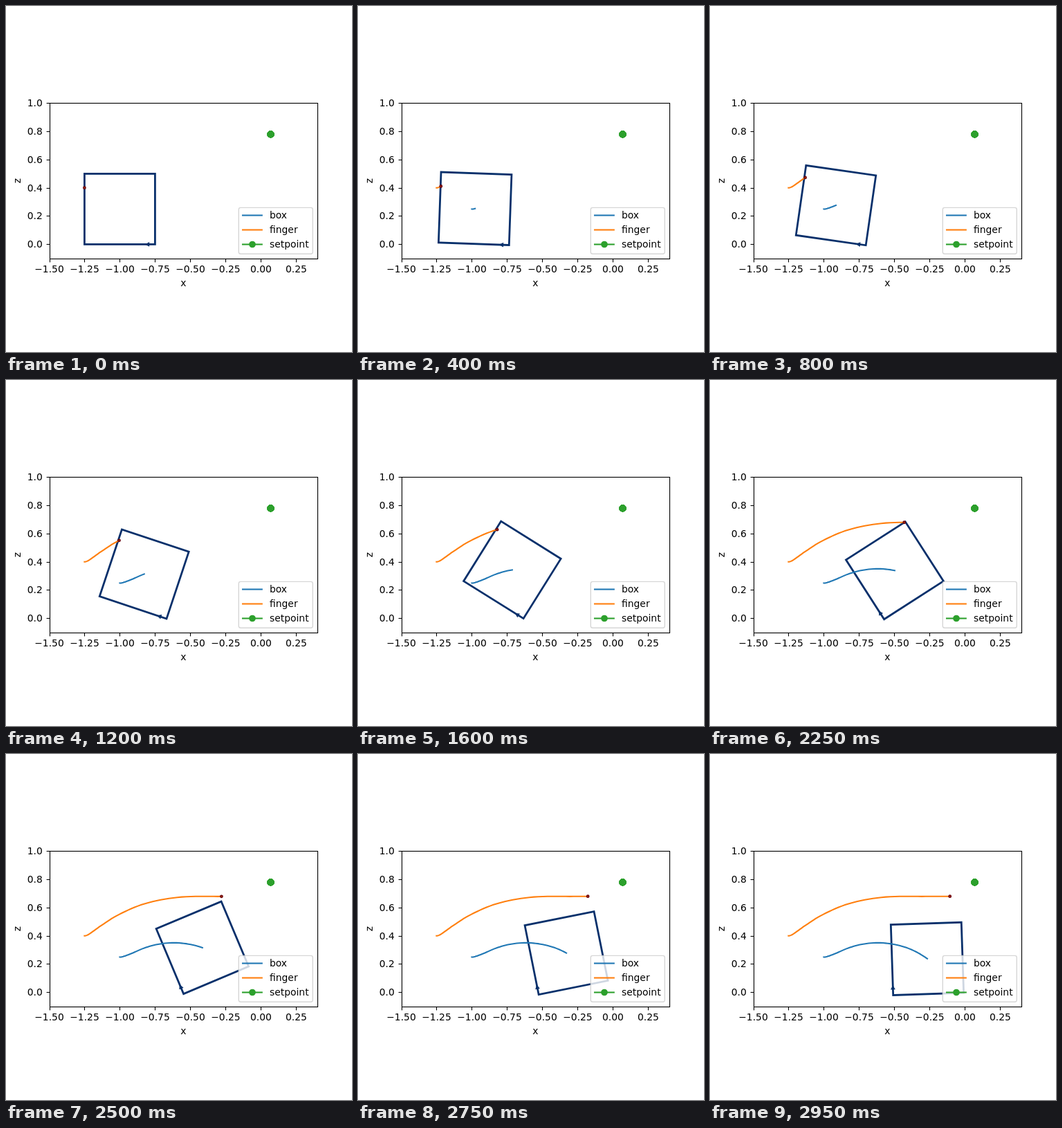
Recreate the animation shown at these times as an HTML page with a canvas. Size 500 by 500 pixels, loop 3 s.

```html
<!DOCTYPE html>
<html lang="en">
<head>
<meta charset="utf-8">
<title>Box and finger</title>
<style>
  html, body { margin: 0; width: 100%; height: 100%; overflow: hidden; background: #fff; }
  canvas { display: block; width: 500px; height: 500px; }
</style>
</head>
<body>
<canvas id="stage" width="500" height="500"></canvas>
<script>
const ctx = document.getElementById('stage').getContext('2d');
const LOOP = 3000, STEP = 50;
const PT = 100 / 72;
const SCALE = 387.5 / 1.9;
const SIDE = 0.5 * SCALE;
const BLUE = '#1f77b4', ORANGE = '#ff7f0e', GREEN = '#2ca02c', NAVY = '#08306b';

const px = x => 62.5 + (x + 1.5) * SCALE;
const pz = z => 140.33 + (1 - z) * SCALE;
const snap = v => Math.floor(v + 0.5) + 0.5;

// Key times and poses: box angle (degrees), pivot corner, finger
const times = [0, 400, 800, 1200, 1600, 2000, 2500, 2950];
const angle = [0, 2.05, 8.2, 18.4, 32, 47.8, 67.2, 88.1];
const pivotX = [215.4, 218.3, 225.2, 232, 239.1, 246.6, 256.6, 264.7];
const pivotY = [344.4, 345.5, 345.8, 344.9, 344.7, 345.1, 346.6, 348.5];
const fingerX = [113.4, 119.8, 137.6, 163.5, 201, 247.6, 311.4, 346.7];
const fingerY = [262.7, 260.5, 247.9, 231.8, 216.2, 207.2, 205.8, 205.7];

function slope(v, i) {
  if (i === 0) return 0;
  const d = j => (v[j + 1] - v[j]) / (times[j + 1] - times[j]);
  const last = times.length - 1;
  if (i === last) return d(i - 1);
  const a = times[i] - times[i - 1], b = times[i + 1] - times[i];
  return (d(i - 1) * b + d(i) * a) / (a + b);
}

// Cubic Hermite interpolation over the key times
function at(v, t) {
  let i = 0;
  while (i < times.length - 2 && t > times[i + 1]) i++;
  const h = times[i + 1] - times[i], u = (t - times[i]) / h;
  const u2 = u * u, u3 = u2 * u;
  return v[i] * (2 * u3 - 3 * u2 + 1) + v[i + 1] * (3 * u2 - 2 * u3)
    + h * (slope(v, i) * (u3 - 2 * u2 + u) + slope(v, i + 1) * (u3 - u2));
}

const finger = t => [at(fingerX, t), at(fingerY, t)];

function center(t) {
  const a = at(angle, t) * Math.PI / 180, c = Math.cos(a), s = Math.sin(a);
  return [at(pivotX, t) + SIDE / 2 * (s - c), at(pivotY, t) - SIDE / 2 * (s + c)];
}

function line(points, color, width, cap = 'butt') {
  ctx.beginPath();
  points.forEach(p => ctx.lineTo(p[0], p[1]));
  ctx.strokeStyle = color;
  ctx.lineWidth = width;
  ctx.lineCap = cap;
  ctx.stroke();
}

function disc(x, y, r, color) {
  ctx.beginPath();
  ctx.arc(x, y, r, 0, 2 * Math.PI);
  ctx.fillStyle = color;
  ctx.fill();
}

function label(s, x, y, align) {
  ctx.font = '13.89px "DejaVu Sans", sans-serif';
  ctx.textAlign = align;
  ctx.textBaseline = 'alphabetic';
  ctx.fillStyle = '#000';
  ctx.fillText(s, x, y);
}

function drawBox(t) {
  ctx.save();
  ctx.translate(at(pivotX, t), at(pivotY, t));
  ctx.rotate(at(angle, t) * Math.PI / 180);
  ctx.strokeStyle = ctx.fillStyle = NAVY;
  ctx.lineWidth = 2 * PT;
  ctx.lineJoin = 'miter';
  ctx.strokeRect(-SIDE, -SIDE, SIDE, SIDE);
  ctx.beginPath();
  ctx.moveTo(-14.6, 0);
  ctx.lineTo(-8.2, -3.4);
  ctx.lineTo(-8.2, 3.4);
  ctx.fill();
  ctx.restore();
}

function drawTrail(pos, t, color) {
  if (t === 0) return;
  const points = [];
  for (let s = 0; s <= t; s += STEP) points.push(pos(s));
  ctx.lineJoin = 'round';
  line(points, color, 1.5 * PT, 'square');
}

function drawAxes() {
  const left = snap(62.5), right = snap(450), top = snap(140.33), bottom = snap(364.67);
  const w = 0.8 * PT;
  for (let i = 0; i < 8; i++) {
    const v = -1.5 + i * 0.25, x = px(v);
    line([[snap(x), bottom], [snap(x), bottom + 4.9]], '#000', w);
    label(v.toFixed(2).replace('-', '\u2212'), x, 385, 'center');
  }
  for (let i = 0; i < 6; i++) {
    const v = i * 0.2, y = pz(v);
    line([[left, snap(y)], [left - 4.9, snap(y)]], '#000', w);
    label(v.toFixed(1), 52.8, Math.round(y + 5), 'right');
  }
  ctx.strokeStyle = '#000';
  ctx.lineWidth = w;
  ctx.lineJoin = 'miter';
  ctx.strokeRect(left, top, right - left, bottom - top);
  label('x', 256.3, 405, 'center');
  ctx.save();
  ctx.translate(21, 252.5);
  ctx.rotate(-Math.PI / 2);
  label('z', 0, 0, 'center');
  ctx.restore();
}

function drawLegend() {
  ctx.beginPath();
  ctx.roundRect(336.3, 291.4, 107, 66.8, 2.8);
  ctx.fillStyle = 'rgba(255,255,255,0.8)';
  ctx.fill();
  ctx.strokeStyle = 'rgba(204,204,204,0.8)';
  ctx.lineWidth = PT;
  ctx.stroke();
  [['box', BLUE, 302.5], ['finger', ORANGE, 323.5], ['setpoint', GREEN, 344.5]].forEach(([name, color, y]) => {
    line([[342, y], [369.8, y]], color, 1.5 * PT, 'square');
    label(name, 381, Math.round(y + 4.6), 'left');
  });
  disc(356, 344.5, 4.86, GREEN);
}

function draw(t) {
  ctx.fillStyle = '#fff';
  ctx.fillRect(0, 0, 500, 500);
  drawBox(t);
  drawTrail(center, t, BLUE);
  drawTrail(finger, t, ORANGE);
  const [fx, fy] = finger(t);
  disc(fx, fy, 2.4, '#67000d');
  disc(fx, fy, 1.1, '#a5300f');
  // Stacked markers harden the edge
  for (let i = 0; i < 20; i++) disc(382.5, 185.4, 4.95, GREEN);
  drawAxes();
  drawLegend();
}

const start = performance.now();
function tick() {
  const t = Math.max(0, performance.now() - start) % LOOP;
  draw(Math.floor(t / STEP) * STEP);
  requestAnimationFrame(tick);
}
tick();
</script>
</body>
</html>
```
